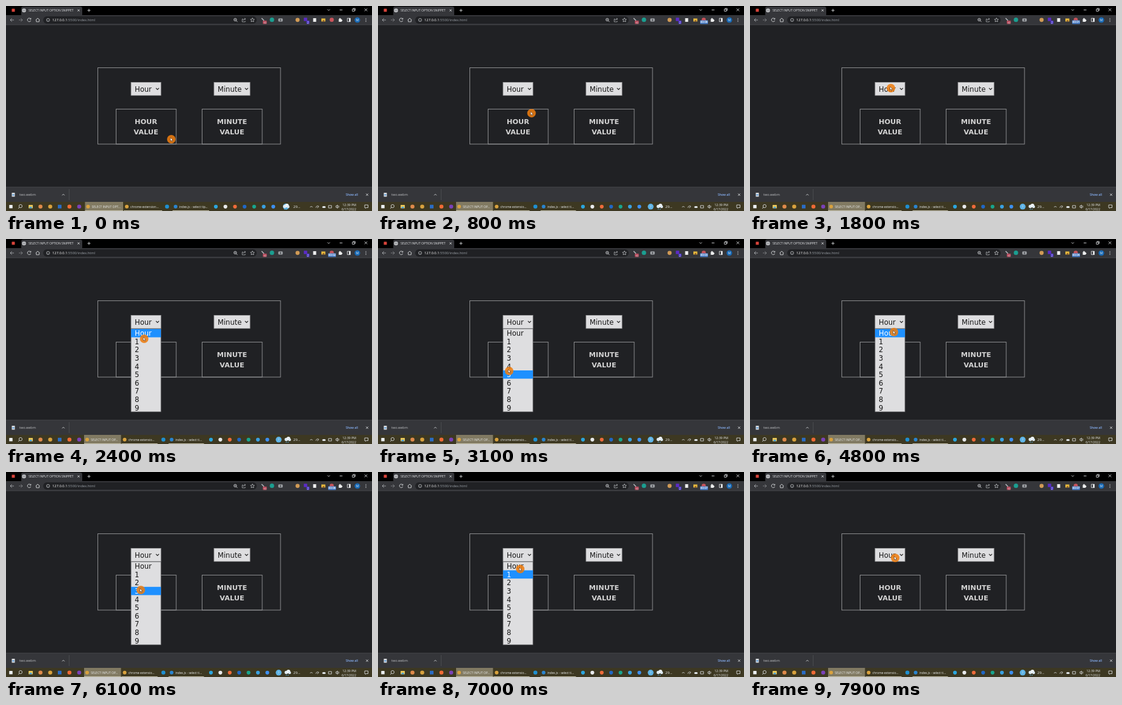
An HTML page that plays this animation: 600 by 337 pixels, repeating every 8 s.

```html
<!DOCTYPE html>
<html lang="en">
<head>
<meta charset="utf-8">
<title>Select input option</title>
<style>
html, body { margin: 0; width: 100%; height: 100%; overflow: hidden; background: #202124; }
svg { display: block; width: 600px; height: 337px; }
text { font: 5px "Open Sans", sans-serif; fill: #eceef0; white-space: pre; }
.page text { font: 11.5px "DejaVu Sans", sans-serif; fill: #161616; }
.page .value { font-weight: bold; font-size: 11.3px; fill: #d2d2d2; text-anchor: middle; }
.line { fill: none; stroke: #d5d7da; stroke-width: .9; }
.frame { fill: none; stroke: #8c8d8f; stroke-width: 1; }
</style>
</head>
<body>
<svg viewBox="0 0 600 337">
  <g id="chrome"></g>
  <g class="page" id="page"></g>
  <g class="page" id="menu"></g>
  <g id="barA"></g>
  <g id="barB"></g>
  <g id="badge">
    <rect x="528" y="23.5" width="13" height="6" rx="1" fill="#3f78c9"/>
    <text id="clock" x="534.5" y="28.3" text-anchor="middle" style="font-size:4.6px;font-weight:bold"></text>
  </g>
  <g id="cursor">
    <circle r="7" fill="#ee7d10" opacity=".87"/>
    <path d="M-1.5-2.5V3L0 1.8 1 4 2 3.5 1 1.4H2.6Z" fill="#fff" stroke="#3a2512" stroke-width=".5"/>
  </g>
</svg>
<script>
const $ = id => document.getElementById(id);
const rect = (x, y, w, h, fill, more = '') =>
  `<rect x="${x}" y="${y}" width="${w}" height="${h}" fill="${fill}" ${more}/>`;
const dot = (x, y, r, fill) => `<circle cx="${x}" cy="${y}" r="${r}" fill="${fill}"/>`;
const square = (x, y, s, fill) => rect(x - s / 2, y - s / 2, s, s, fill, 'rx=".6"');
const line = (d, more = '') => `<path class="line" d="${d}" ${more}/>`;
const frame = (x, y, w, h) => `<rect class="frame" x="${x}" y="${y}" width="${w}" height="${h}"/>`;
const label = (x, y, s, more = '') => `<text x="${x}" y="${y}" ${more}>${s}</text>`;
const cross = (x, y, r) => line(`M${x - r} ${y - r}l${2 * r} ${2 * r}m0 ${-2 * r}l${-2 * r} ${2 * r}`);
const size = px => `style="font-size:${px}px"`;

// Browser window
$('chrome').innerHTML =
  rect(0, 0, 600, 337, '#202124') + rect(0, 0, 600, 15, '#000') +
  rect(25, 1, 100, 16, '#35363a', 'rx="3"') + rect(0, 15, 600, 16, '#35363a') +
  rect(0, 30.5, 600, .8, '#4a4b4e') +
  square(12, 7, 5, '#d9443a') +
  dot(29.5, 7.2, 3.2, '#c9cbce') + line('M26.5 7.2h6M29.5 4.2v6', 'style="stroke:#5b5d60;stroke-width:.5"') +
  label(37, 9.2, 'SELECT INPUT OPTION SNIPPET') +
  cross(119, 7.2, 1.7) + line('M133.5 7.2h5M136 4.7v5') +
  line('M527 5.5l2 2 2-2M547 6.5h4.5M567.8 5.2h3.4v3.4h-3.4zM569 5V4h3.4v3.4h-1') + cross(590, 6.3, 2.2) +
  line('M13 23H7m2.7-2.7L7 23l2.7 2.7', 'opacity=".7"') +
  line('M21 23h6m-2.7-2.7L27 23l-2.7 2.7', 'opacity=".45"') +
  line('M40.3 21a2.9 2.9 0 1 0 .4 3M40.8 19.8v2h-2') +
  line('M48.7 23l3.3-3 3.3 3M49.7 22.4v3.5h4.6v-3.5') +
  rect(61, 17, 350, 12, '#202124', 'rx="6"') +
  line('M71.6 23a2.6 2.6 0 1 1-5.2 0 2.6 2.6 0 1 1 5.2 0M69 22.7v1.6', 'style="stroke-width:.7"') +
  label(76, 25.2, '<tspan fill="#fff">127.0.0.1</tspan><tspan fill="#9aa0a6">:5500/index.html</tspan>', size(5.8)) +
  line('M378 22.5a2.2 2.2 0 1 1-4.4 0 2.2 2.2 0 1 1 4.4 0M377.5 24.2l2 2M374.8 22.5h2') +
  line('M389 21.5h-1.8v4.5h5v-1.5M389 24c0-2 1.5-2.7 3.5-2.7m-1.5-1.5l1.7 1.5-1.7 1.5', 'opacity=".7"') +
  line('M404 19.6l1 2.2 2.3.2-1.7 1.6.5 2.4-2.1-1.2-2.1 1.2.5-2.4-1.7-1.6 2.3-.2z', 'style="stroke-width:.7"') +
  line('M419 20l4 4', 'style="stroke:#b9bcc0;stroke-width:1.5"') + rect(421, 24, 6.5, 5.5, '#b54a5c', 'rx="1"') +
  label(424.2, 28.5, '10', 'text-anchor="middle" ' + size(4)) +
  dot(436, 22.7, 3.6, '#1b9e90') + rect(446.5, 20.5, 7, 5, '#a9acb0', 'rx="1"') + dot(450, 23, 1.5, '#55585c') +
  dot(478, 22.8, 3.4, '#d09a55') + square(491, 22, 5.5, '#5b2bc6') + rect(492.5, 24, 5, 5.5, '#4d37c7', 'rx="1"') +
  label(495, 28.6, '2', 'text-anchor="middle" ' + size(4.5)) +
  rect(503.5, 20, 5, 6, '#eceded') + rect(517, 20.5, 6.5, 5, '#e6b93c') + dot(520.5, 24.5, 1.5, '#8d5b2b') +
  dot(534, 22.7, 3.4, '#c9545b') +
  rect(545.5, 21.3, 4.7, 4.7, '#eceded') + dot(547.5, 21, 1.2, '#eceded') + dot(550.3, 23.8, 1.2, '#eceded') +
  line('M559.5 20.2h5v5.5h-5z') + rect(562.2, 20, 2.5, 6, '#e4e6e9') +
  dot(576, 23, 4.6, '#1769b5') + label(576, 24.8, 'M', 'text-anchor="middle"') +
  [20.6, 23, 25.4].map(y => dot(590, y, .65, '#e4e6e9')).join('') +
  // download shelf
  rect(0, 297.5, 600, 25, '#35363a') + rect(0, 297.5, 600, .7, '#4b4c50') +
  rect(9.5, 307, 5, 6.5, '#d9dce0') + rect(10.5, 309.5, 3, 2, '#4d94d8') +
  label(22, 312.3, 'two.webm', size(5.5) + ' opacity=".75"') +
  line('M92 311.3l2-2 2 2') + rect(103, 301, .7, 18, '#54565a') +
  label(557, 312.2, 'Show all', 'style="font-weight:600;fill:#8ab4f8"') + cross(592, 310.2, 1.8) +
  // taskbar base
  rect(0, 322, 600, 15, '#3d3822') +
  square(8, 329.8, 5.5, '#eceff1') +
  line('M26.5 329a2.6 2.6 0 1 1-5.2 0 2.6 2.6 0 1 1 5.2 0M22 331l-2 2') +
  rect(37, 327, 7, 5.5, '#e8c65a', 'rx=".6"') + rect(38.5, 330, 4, 2.5, '#4ba3dd') +
  dot(56.5, 329.8, 3.3, '#df8a4a') + dot(72.5, 329.8, 3.3, '#d9a23e') + square(88, 329.8, 6, '#2b6cc4') +
  dot(104, 329.8, 3.3, '#ef6a35') + dot(120, 329.8, 3.3, '#7a41b8') +
  label(471, 332.2, '29...', size(6)) +
  line('M498.5 331l2-2 2 2') + line('M508 331.5a3 3 0 0 1 5-2M510 332l3-2.5') +
  rect(518.5, 329, 5.5, 3, '#dfe3e6', 'rx="1.5"') + line('M528.7 328h5v4h-5z') +
  line('M541 328.5h1l1.5-1.3v5.2l-1.5-1.3h-1zM545 328q1.5 1.8 0 3.7') +
  label(574, 328.6, '12:39 PM', 'text-anchor="end" ' + size(5.2)) +
  label(574, 335.6, '6/17/2022', 'text-anchor="end" ' + size(5)) +
  line('M588 327h5.5v4.5h-3l-1.2 1.2v-1.2H588z');

// Page content
const select = (x, w, s) =>
  rect(x, 125.5, w, 21.5, '#dedee0', 'stroke="#98999b" stroke-width=".8"') + label(x + 6, 141, s) +
  `<path d="M${x + w - 8.2} 134.9l2.5 2.6 2.5-2.6" fill="none" stroke="#222" stroke-width="1.2"/>`;
const valueBox = (x, s) => frame(x, 169.5, 98.5, 57.5) +
  label(x + 49, 194, s, 'class="value"') + label(x + 49, 211, 'VALUE', 'class="value"');
$('page').innerHTML = frame(150.5, 101.5, 299.5, 125.5) +
  select(205, 49, 'Hour') + select(341, 59, 'Minute') +
  valueBox(180.5, 'HOUR') + valueBox(321.5, 'MINUTE');

const TOP = 148, ROW = 13.6;
$('menu').innerHTML =
  rect(205, 147.7, 49, 136.3, '#dedee0', 'stroke="#6c6d6f" stroke-width=".8"') +
  ['Hour', 1, 2, 3, 4, 5, 6, 7, 8, 9].map((s, i) =>
    `<g>${rect(205, TOP + i * ROW, 49, ROW, 'none')}${label(211, 159.2 + i * ROW, s)}</g>`).join('');
const rows = [...$('menu').querySelectorAll('g')];

// Taskbar buttons: [left, width, icon colour, caption]
const button = ([x, w, color, s], i) =>
  (i ? '' : rect(x, 322, w, 15, '#817a62')) + rect(x, 336, w, 1, '#c9c5b0') +
  dot(x + 5, 329.8, 3, color) + label(x + 11, 331.8, s);
const bar = (buttons, edge, first, step, colors) => buttons.map(button).join('') +
  dot(edge, 329.8, 3.3, '#1f8fd0') +
  colors.map((c, i) => dot(first + i * step, 329.8, 3.1, c)).join('');
const cloud = x => dot(x - 2.5, 329.5, 2.8, '#dce8f0') + dot(x + 1, 328, 3, '#eef4f8') +
  dot(x + 3, 330, 2.3, '#dce8f0') + line(`M${x - 2} 333l-1 2m4-2l-1 2`, 'style="stroke:#55b2e8"');
const apps = ['#2ca5dd', '#e8eaec', '#ee6b3a', '#2167c4', '#18a58d', '#3aa0e0', '#3d8ff0'];
$('barA').innerHTML = bar([
  [129.5, 62.5, '#d9a23e', 'SELECT INPUT OPT...'],
  [193, 63, '#d9a23e', 'chrome-extension...'],
  [273, 60, '#2a84cf', 'index.js - select tip...']], 264, 344, 15.7, apps) +
  dot(459, 329.8, 5, '#58aede') + cloud(459.5);
$('barB').innerHTML = bar([
  [128, 60.5, '#d9a23e', 'SELECT INPUT OP...'],
  [189.5, 59, '#d9a23e', 'chrome-extensio...'],
  [266.5, 58, '#2a84cf', 'index.js - select ti...']], 258, 336, 15.4, apps) +
  dot(447, 329.8, 4.8, '#5fb4e6') + label(447, 331.8, '?', 'text-anchor="middle"') + cloud(462);

// Pointer path: [time, x, y]
const path = [
  [0, 271, 219], [300, 270, 217], [900, 248, 168], [1400, 232, 138], [1800, 231, 135], [2200, 231, 136],
  [2600, 222, 192], [2900, 216, 219], [3100, 215, 217], [3500, 220, 212], [3900, 231, 209],
  [4100, 234, 218], [4250, 235, 212], [4600, 237, 162], [4800, 236, 153], [5200, 234, 154],
  [5800, 223, 186], [6100, 221, 194], [6400, 222, 192], [7100, 235, 154], [7500, 238, 142], [8000, 238, 141]
];
function pointer(t) {
  const i = Math.max(1, path.findIndex(p => p[0] >= t));
  const [a, b] = [path[i - 1], path[i]];
  const k = (t - a[0]) / (b[0] - a[0]);
  return [a[1] + (b[1] - a[1]) * k, a[2] + (b[2] - a[2]) * k];
}

const show = (id, on) => $(id).style.display = on ? '' : 'none';
function draw(now) {
  const t = Math.floor(now % 8000 / 100) * 100;
  const started = t >= 500;
  show('barA', !started);
  show('barB', started);
  show('badge', started);
  $('clock').textContent = '00:0' + Math.floor(t / 1000);
  show('menu', t >= 2200 && t < 7300);
  // the highlight trails the pointer by one step
  const y = pointer(Math.max(0, t - 100))[1];
  const hot = Math.max(0, Math.min(9, Math.floor((y - TOP) / ROW)));
  rows.forEach((row, i) => {
    row.firstChild.setAttribute('fill', i === hot ? '#1e90ff' : 'none');
    row.lastChild.style.fill = i === hot ? '#fff' : '';
  });
  $('cursor').setAttribute('transform', `translate(${pointer(t)})`);
  requestAnimationFrame(draw);
}
requestAnimationFrame(draw);
</script>
</body>
</html>
```
